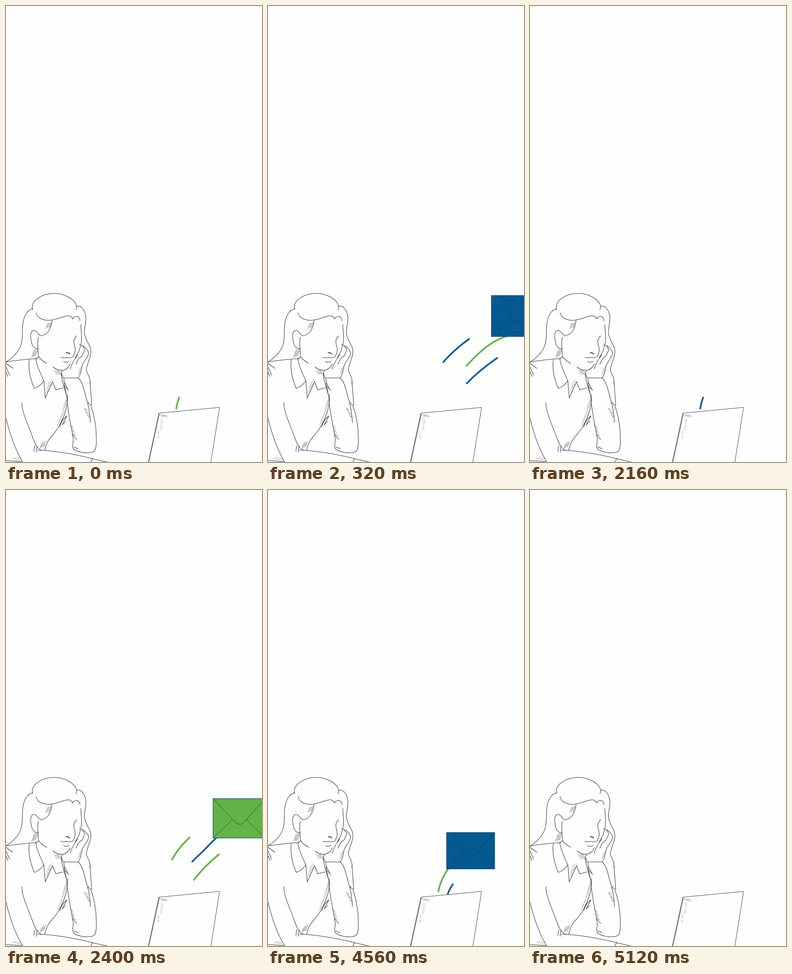
These frames come from a looping animation (561x998 px, 5.2 s). An HTML page:

```html
<!DOCTYPE html>
<html lang="en">
<head>
<meta charset="utf-8">
<title>Mail flying out of a laptop</title>
<style>
  html, body { margin: 0; width: 100%; height: 100%; overflow: hidden; background: #fefefe; }
  svg { display: block; width: 100%; height: 100%; }
  path { fill: none; }
  #woman, #laptop { stroke: #333; stroke-width: 1.05; stroke-linecap: round; stroke-linejoin: round; }
  #hatch { stroke: #777; stroke-width: .7; }
  .trail { stroke-width: 3.6; stroke-linecap: round; }
  #envelope path { stroke: #123a58; stroke-width: .9; }
  #envelope .shade { stroke: #6d8798; stroke-width: .8; stroke-dasharray: 4 2 1 2; }
</style>
</head>
<body>
<svg viewBox="0 0 561 998">
  <g id="woman">
    <!-- hair -->
    <path d="M58 664C54 645 78 629 106 629C130 629 152 643 155 657L153.500 665"/>
    <path d="M59 663C46 664 39 680 37 695C35 712 37 722 34 737C30 757 14 770 2 778L0 780"/>
    <path d="M155 657C166 655 173 666 175 680C176 695 171 705 172 716C174 735 187 742 186 758C185 772 177 784 176 796C177 805 186 812 184 826"/>
    <path d="M66 671C68 683 80 688 95 688C115 686 125 678 137 678C142 678 144 681 146 685C148 680 153 678 157 680C161 682 162 685 162 689"/>
    <path d="M164 697C164 712 168 728 164 740M155 722C147 728 148 738 151 746C153 756 150 762 146 769"/>
    <!-- ear, face -->
    <path d="M101 688C99 705 92 720 76 722C70 719 68 710 61 710C54 711 53 720 55 732C57 745 62 751 71 750M71 725C68 735 70 748 71 765"/>
    <path d="M71 766C73 771 80 777 89 782M103 790C110 796 118 798 125 797C132 796 138 790 141 783"/>
    <path d="M120 769Q127 771 133 769Q138 771 144 769M126 778Q131 782 138 778"/>
    <path stroke-width="1.800" d="M132 759Q136 758 139.500 761.500"/>
    <!-- hand -->
    <path d="M161 741C170 743 180 751 181 760C180 770 170 777 167 787C164 797 165 806 158 814H125L121 803L124 798"/>
    <path d="M164 742C160 749 163 754 157 760L152 770M168 745L173 752L166 767C158 769 157 778 153 784M158 763C150 773 143 785 141 795"/>
    <!-- collar -->
    <path d="M51 774C48 800 55 820 62 837C70 834 78 828 83 820M65 770C67 790 78 808 83 821L86 858L102 822L109 840L125 836M71 768L65 773M121 803C121 815 125 827 131 847"/>
    <!-- raised arm -->
    <path d="M127 815C127 835 132 842 134 865C136 890 143 920 147 945C149 957 142 965 150 971C160 977 180 981 193 975C200 968 198 945 197 925C194 900 190 885 186 876"/>
    <path d="M158 814C166 820 170 835 175 855C180 870 184 890 185 912M184 822L188 874M180 867Q184 875 188 874M128 824L137 842M127 831L134 838M146 938L155 949M149 965L158 969"/>
    <!-- body, lower arm -->
    <path d="M0 779C20 776 40 773 64 772M0 782L15 793M0 790L8 808M0 800L4 811"/>
    <path d="M35 868C33 885 50 920 58 943C63 957 68 968 77 972M0 902C8 935 20 970 36 997L0 995"/>
    <path d="M134 850C138 865 130 895 116 920C105 940 90 945 85 972M133 897C126 903 120 911 118 921M133 898L123 917L131 909"/>
    <path d="M69 972C100 973 150 980 190 991L222 998M190 990L186 998M68 963L66 977M63 962L61 975"/>
  </g>
  <g id="trails"></g>
  <g id="laptop">
    <path d="M313 998L336.500 891L468 878.500L449 998M335 891L312 998" stroke-width=".9"/>
  </g>
  <path id="hatch"/>
  <g id="envelope">
    <rect width="110" height="83" stroke="#123a58"/>
    <path d="M0 0L46 49Q51 54 55 54H58Q62 54 66 49L110 0M0 83L40 45M110 83L70 44"/>
    <path class="shade" d="M3 1L21 20M2 5L14 17M3 80L16 67"/>
  </g>
</svg>
<script>
const GREEN = '#62b346', BLUE = '#045991';
const STEP = 80, LOOP = 5200, LAST = 7;
const $ = id => document.getElementById(id);

// Pencil shading: n parallel strokes (lx, ly) placed along (dx, dy)
const hatch = (x, y, n, dx, dy, lx, ly) => Array.from({ length: n }, (_, i) =>
  `M${x + dx * i} ${y + dy * i}l${lx + i % 2} ${ly - i % 3}`).join('');

$('hatch').setAttribute('d', [
  hatch(91, 694, 5, 2, -.5, -4, 13), hatch(80, 719, 7, 2.3, -1.7, -1, 1),
  hatch(56, 769, 6, 1.8, -.6, 5, -16), hatch(106, 797, 6, 2.2, 0, 5, 11),
  hatch(87, 846, 6, 1, -4, 8, -7), hatch(157, 807, 5, .8, -3, 6, -5),
  hatch(124, 883, 7, .9, -3, 6, -6), hatch(112, 920, 11, 1.3, -3.4, 3, -4),
  hatch(74, 968, 6, 1.8, -.8, 4, -11), hatch(140, 916, 8, .9, 3, 6, 5),
  hatch(170, 879, 9, 1.2, 2.5, 6, 4), hatch(13, 992, 6, 3, .4, 4, -4),
  hatch(337, 894, 7, 2, .1, 5, 6), hatch(340, 903, 6, -.5, 4.5, 4, 3),
  hatch(332, 931, 5, 0, 4, 3, -1)
].join(''));

// Each trail: curve, head and tail distance along it for step k
const trails = [
  { d: 'M353 843C356 816 374 775 450 722', head: k => k < 2 ? 0 : 48 + 50 * (k - 2), tail: k => 36 * (k - 2) },
  { d: 'M373 881C377 857 386 832 425 797C455 770 490 714 575 715',
    head: k => 25 + 27 * k + 6.3 * k * k, tail: k => 40 + 37.6 * (k - 2) },
  { d: 'M394 884C404 855 450 803 518 760', head: k => k < 1 ? 0 : 24 + 45 * (k - 1), tail: k => 36 * (k - 2) }
];
for (const trail of trails) {
  trail.path = document.createElementNS('http://www.w3.org/2000/svg', 'path');
  trail.path.setAttribute('d', trail.d);
  trail.path.setAttribute('class', 'trail');
  $('trails').append(trail.path);
  trail.length = trail.path.getTotalLength();
}

// The last burst skips its opening step
const bursts = [
  { start: 0, first: 0, main: GREEN, side: BLUE },
  { start: 2160, first: 0, main: BLUE, side: GREEN },
  { start: 4480, first: 1, main: GREEN, side: BLUE }
];

function drawTrail(trail, k, color) {
  const from = Math.max(0, trail.tail(k)), to = Math.min(trail.length, trail.head(k));
  const shown = k >= 0 && to > from;
  trail.path.style.display = shown ? '' : 'none';
  if (!shown) return;
  trail.path.style.stroke = color;
  trail.path.style.strokeDasharray = `0 ${from} ${to - from} 999`;
  // A leading zero dash would leave a round dot at the curve's start
  trail.path.style.strokeDasharray = `${to - from} 999`;
  trail.path.style.strokeDashoffset = -from;
}

function drawEnvelope(k, color) {
  const shown = k >= 1 && k <= 5;
  $('envelope').style.display = shown ? '' : 'none';
  if (!shown) return;
  const u = k - 2, scale = 1 + .04 * u;
  const x = 476 + 33.5 * u + 1.5 * u * u, y = 755.5 - 35.5 * u - 1.5 * u * u;
  $('envelope').setAttribute('transform', `translate(${x} ${y}) scale(${scale}) translate(-55 -41.5)`);
  $('envelope').setAttribute('fill', color);
}

function draw(now) {
  const t = now % LOOP;
  const stepOf = b => Math.floor((t - b.start) / STEP);
  const burst = bursts.find(b => stepOf(b) >= b.first && stepOf(b) <= LAST);
  const k = burst ? stepOf(burst) : -1;
  trails.forEach((trail, i) => drawTrail(trail, k, burst && (i === 1 ? burst.main : burst.side)));
  drawEnvelope(k, burst && burst.side);
}

const begin = performance.now();
function tick() {
  draw(performance.now() - begin);
  requestAnimationFrame(tick);
}
tick();
</script>
</body>
</html>
```
